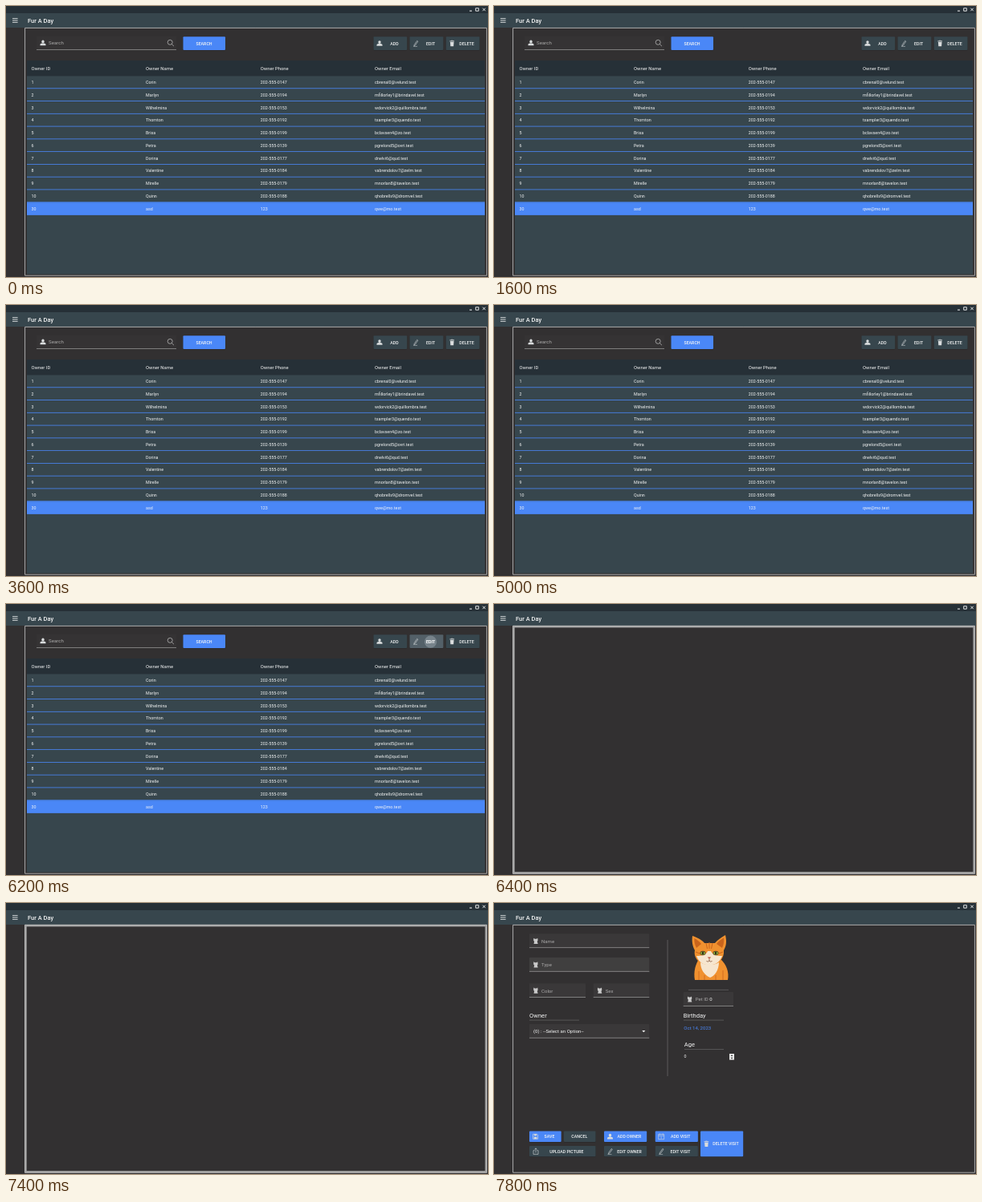
Write an HTML page with a canvas that moves like this. It is 600 px wide and 338 px high and loops after 8 s.

```html
<!DOCTYPE html>
<html lang="en">
<head>
<meta charset="utf-8">
<title>Pet owners</title>
<style>
  html, body { margin: 0; width: 100%; height: 100%; overflow: hidden; background: #323031; }
  canvas { display: block; width: 100vw; height: 100vh; }
</style>
</head>
<body>
<canvas id="stage"></canvas>
<script>
const W = 600, H = 338, LOOP = 8000, STEP = 200;
const canvas = document.getElementById('stage');
const ctx = canvas.getContext('2d');
const C = {
  dark: '#263037', teal: '#37464d', page: '#323031', field: '#3a3839', focus: '#403f3f',
  blue: '#4a87f7', hotBlue: '#7ea9f9', hotTeal: '#536068', line: '#5f5e5f',
  edge: '#b9b9b9', grey: '#aaa9a9', white: '#f4f5f5'
};
const CELL = 5.35, LABEL = 5.9, INPUT = 6.05, HEAD = 7.6;

const owners = [
  ['1', 'Corin', '202-555-0147', 'cbrenal0@velund.test'],
  ['2', 'Marlyn', '202-555-0194', 'mfillorley1@brindavel.test'],
  ['3', 'Wilhelmina', '202-555-0153', 'wdorvick2@quillombra.test'],
  ['4', 'Thornton', '202-555-0192', 'tsampler3@quendo.test'],
  ['5', 'Brisa', '202-555-0199', 'bclavsen4@zo.test'],
  ['6', 'Petra', '202-555-0139', 'pgrelond5@ovri.test'],
  ['7', 'Dorina', '202-555-0177', 'dnelvi6@qud.test'],
  ['8', 'Valentine', '202-555-0184', 'vabrendolov7@zelm.test'],
  ['9', 'Mirelle', '202-555-0179', 'mnorlan8@tavelon.test'],
  ['10', 'Quinn', '202-555-0188', 'qhobrells9@dromvel.test'],
  ['30', 'asd', '123', 'qwe@mo.test']
];

function rect(x, y, w, h, color) {
  ctx.fillStyle = color;
  ctx.fillRect(x, y, w, h);
}

function round(x, y, w, h, r, color) {
  ctx.fillStyle = color;
  ctx.beginPath();
  ctx.roundRect(x, y, w, h, r);
  ctx.fill();
}

function text(s, x, y, size, color = C.white, weight = 400, align = 'left') {
  ctx.font = `${weight} ${size}px Roboto, sans-serif`;
  ctx.textAlign = align;
  ctx.textBaseline = 'alphabetic';
  ctx.fillStyle = color;
  ctx.fillText(s, x, y + size * 0.355);
  return ctx.measureText(s).width;
}

function stroke(d, color, width = 0.7) {
  ctx.strokeStyle = color;
  ctx.lineWidth = width;
  ctx.stroke(new Path2D(d));
}

function fill(d, color) {
  ctx.fillStyle = color;
  ctx.fill(new Path2D(d));
}

function oval(x, y, rx, ry, color) {
  ctx.fillStyle = color;
  ctx.beginPath();
  ctx.ellipse(x, y, rx, ry, 0, 0, Math.PI * 2);
  ctx.fill();
}

// Each icon is drawn around its own centre.
const icons = {
  person(c) {
    oval(0, -1.5, 1.7, 1.9, c);
    fill('M-3.5 3.2V2C-3.5 .8-1.5.5 0 .5S3.5.8 3.5 2V3.2Z', c);
  },
  pencil(c) {
    stroke('M-1.8 1.8L1.7-3.2L2.8-2.4L-.7 2.5L-2.1 3.2Z', c, 0.6);
    stroke('M-3 3.8H2', c, 0.5);
  },
  trash(c) {
    rect(-2.8, -3.2, 5.6, 1, c);
    rect(-1, -3.8, 2, 0.7, c);
    fill('M-2.3-1.7H2.3L1.9 3.6H-1.9Z', c);
  },
  save(c) {
    stroke('M-3-3H2L3-2V3H-3Z', c, 0.7);
    rect(-1.6, -3, 3.2, 2, c);
    rect(-1.8, 0.5, 3.6, 2.5, c);
  },
  cat(c) {
    fill('M-2.7-3.6L-1.2-2.6H.9L2.3-3.6L2.6-.5L1.8.8L2.7 3.6H-2.5L-1.8.8L-2.8-.4Z', c);
  },
  face(c) {
    fill('M-3.6-3.8L-1.6-2.5H1.6L3.6-3.8V2L2 3.6H-2L-3.6 2Z', c);
  },
  upload(c) {
    stroke('M-1.5-1H-3V3.7H3V-1H1.5M0 1.8V-3.8M-1.5-2.3L0-3.8L1.5-2.3', c, 0.6);
  },
  calendar(c) {
    stroke('M-3.5-2.8H3.5V3.5H-3.5ZM-3.5-1H3.5M-2-3.8V-2M2-3.8V-2', c, 0.6);
    stroke('M0 .2V2.5', c, 0.6);
  }
};

function icon(name, x, y, color = '#d9dcdd') {
  ctx.save();
  ctx.translate(x, y);
  icons[name](color);
  ctx.restore();
}

function button(label, x, y, w, h, color, tx, glyph, gx) {
  round(x, y + 0.5, w, h, 1, 'rgba(0,0,0,.25)');
  round(x, y, w, h, 1, color);
  if (glyph) icon(glyph, gx, y + h / 2);
  text(label, tx, y + h / 2 + 0.1, 5.25, C.white, 500, 'center');
}

function field(x, y, w, label, value = '', glyph = 'person', color = C.field) {
  round(x, y, w, 17.5, [1, 1, 0, 0], color);
  rect(x, y + 17, w, 0.8, '#929192');
  icon(glyph, x + 8, y + 9, '#c9c9c9');
  const end = text(label + ' ', x + 15, y + 9.2, INPUT, C.grey);
  text(value, x + 15 + end, y + 9.2, INPUT);
}

function shell() {
  rect(0, 0, W, H, C.page);
  rect(0, 0, W, 9, C.dark);
  rect(0, 9, W, 18, C.teal);
  rect(577, 5.6, 3, 1, C.white);
  stroke('M584.7 2.7H588.3V6.2H584.7Z', C.white, 0.9);
  stroke('M593.3 2.7L596.8 6.2M596.8 2.7L593.3 6.2', C.white, 0.9);
  for (let i = 0; i < 3; i++) rect(8, 15.3 + i * 2.3, 6.6, 0.8, C.white);
  text('Fur A Day', 27, 18.2, 7.5, C.white, 500);
  stroke('M23.6 27.4H598.4V336.2H23.6Z', C.edge, 0.9);
}

function listPage(pressed) {
  rect(38, 37.5, 174, 17, '#353334');
  rect(38, 54.2, 174, 0.8, '#929192');
  icon('person', 46, 46);
  text('Search', 53, 46.2, 6.15, C.grey);
  ctx.strokeStyle = '#c4c4c4';
  ctx.lineWidth = 0.7;
  ctx.beginPath();
  ctx.arc(204.2, 45.3, 3, 0, Math.PI * 2);
  ctx.moveTo(206.3, 47.5);
  ctx.lineTo(209, 50.2);
  ctx.stroke();

  button('SEARCH', 220.5, 38.3, 52.5, 16.6, C.blue, 246.5);
  button('ADD', 457.5, 38.3, 41.7, 16.6, C.teal, 483.5, 'person', 465);
  button('EDIT', 502.5, 38.3, 41.9, 16.6, pressed ? C.hotTeal : C.teal, 528.6, 'pencil', 510);
  if (pressed) {
    oval(528.5, 47.2, 7.6, 7.6, 'rgba(170,180,188,.42)');
    text('EDIT', 528.6, 46.7, 5.25, C.white, 500, 'center');
  }
  button('DELETE', 547.7, 38.3, 41.8, 16.6, C.teal, 573.5, 'trash', 555.2);

  const cols = [31.5, 174, 316.7, 459], top = 87.4, pitch = 15.77;
  rect(26, 68, 570, 266.5, C.teal);
  rect(26, 68, 570, 19.4, C.dark);
  ['Owner ID', 'Owner Name', 'Owner Phone', 'Owner Email']
    .forEach((s, i) => text(s, cols[i], 77.7, LABEL));
  owners.forEach((row, r) => {
    const y = top + r * pitch;
    if (r === owners.length - 1) rect(26, y, 570, pitch, C.blue);
    else rect(26, y + pitch - 0.8, 570, 0.8, C.blue);
    row.forEach((s, i) => text(s, cols[i], y + 7.8, CELL));
  });
}

function ownerPage(hot) {
  field(44.2, 38.3, 76.6, 'Owner ID', '30');
  rect(68, 73.2, 159, 0.8, C.line);
  field(44.2, 90.5, 206, 'Name', 'asd');
  field(44.2, 123.6, 206, 'Phone', '123');
  field(44.2, 156.8, 206, 'Email', 'qwe@mo.test');

  rect(279, 38.5, 308.7, 287.2, C.teal);
  rect(279, 38.5, 308.7, 27, C.dark);
  const heads = ['Pet ID', 'Pet Name', 'Pet Type', 'Pet Color', 'Pet Age', 'Pet Sex', 'Pet Birth Date'];
  const xs = [284.5, 329.5, 368.5, 413.4, 458.3, 502.7, 548];
  heads.forEach((s, i) => {
    if (i === 1 || i === 6) {
      const cut = s.lastIndexOf(' ');
      text(s.slice(0, cut), xs[i], 48.2, LABEL);
      text(s.slice(cut + 1), xs[i], 55.4, LABEL);
    } else text(s, xs[i], 52, LABEL);
  });

  button('SAVE', 44.5, 285.8, 39.7, 13.2, C.blue, 69.5, 'save', 52.2);
  button('CANCEL', 87.5, 285.8, 39.5, 13.2, C.teal, 107);
  button('ADD PET', 140.5, 285.8, 53.5, 13.2, hot ? C.hotBlue : C.blue, 172.5, 'face', 148.3);
  button('EDIT PET', 140.5, 304.3, 53.5, 13.2, C.teal, 172.3, 'pencil', 148);
  button('DELETE PET', 197, 285.8, 53.2, 31.7, C.blue, 228.5, 'trash', 204.3);
}

function catPicture() {
  const orange = '#f0912f', deep = '#c9641c', cream = '#f6e6cf';
  fill('M250 96C248 86 251 76 255 70H282C289 76 293 86 291 96Z', orange);
  fill('M247 41C253 43 259 46 262 50H275C278 46 283 43 288 40C290 48 289 54 286 59C287 69 280 77 268 77S248 69 250 59C247 54 246 47 247 41Z', orange);
  fill('M249.5 44C253 46 256 48 258 51L252 56C250 52 249 48 249.5 44ZM286 43.5C282 46 279 48 277 51L284 56C286 52 286.5 48 286 43.5Z', deep);
  fill('M257 74C262 78 275 78 280 74C280 83 275 91 269 93C262 90 257 83 257 74Z', cream);
  fill('M252 66C258 66 264 65 266 60H270C272 65 278 66 284 66C281 74 275 77.5 268 77.5S255 74 252 66Z', cream);
  stroke('M264 50L265.5 57M268 49V57M272 50L270.5 57M251 61L256 63M285 61L280 63', deep, 1);
  for (const x of [260, 276]) {
    oval(x, 62.5, 3.5, 2.7, '#54351c');
    oval(x, 62.5, 2.8, 2.1, '#8dab39');
    oval(x, 62.5, 0.9, 1.9, '#1c1c17');
  }
  fill('M265.7 67.5H270.3L268 70Z', '#bb5b43');
  stroke('M268 70V72M264.5 72.5Q267 74 268 72Q269 74 271.5 72.5', '#744026', 0.7);
  stroke('M255 85V96M262 90V96M276 90V96M285 84V96', deep, 0.8);
}

function petPage() {
  field(44, 38.3, 149.3, 'Name', '', 'cat');
  field(44, 67.9, 149.3, 'Type', '', 'cat', C.focus);
  field(44, 100.2, 70, 'Color', '', 'cat');
  field(123.7, 100.2, 69.6, 'Sex', '', 'cat');
  text('Owner', 44, 140, HEAD);
  rect(44, 145.7, 62, 0.8, C.line);
  round(44, 151, 149.3, 17.3, [1, 1, 0, 0], C.field);
  rect(44, 167.8, 149.3, 0.8, '#929192');
  text('(0) : --Select an Option--', 49, 160, INPUT);
  fill('M184.3 159H188.3L186.3 161.2Z', C.white);
  rect(215.6, 46, 0.9, 170, C.line);

  catPicture();
  rect(242, 107.9, 50, 0.8, C.line);
  field(235.7, 111, 62.3, 'Pet ID', '0', 'cat');
  text('Birthday', 235.7, 140, HEAD);
  rect(236, 145.7, 50, 0.8, C.line);
  text('Oct 14, 2023', 236.3, 155.6, INPUT, C.blue);
  text('Age', 236.7, 176.7, HEAD);
  rect(237, 182.2, 49, 0.8, C.line);
  text('0', 236.6, 191.3, CELL);
  rect(293, 188, 6, 7.6, '#e9e9e9');
  fill('M294.6 191L296 189.3L297.4 191ZM294.6 192.7L296 194.4L297.4 192.7Z', '#333');

  const y1 = 284.6, y2 = 303, h = 13.3;
  button('SAVE', 44, y1, 39.7, h, C.blue, 69, 'save', 51.6);
  button('CANCEL', 87, y1, 39.5, h, C.teal, 106.3);
  button('ADD OWNER', 137, y1, 53.2, h, C.blue, 168.4, 'person', 144.5);
  button('ADD VISIT', 200.7, y1, 53.2, h, C.blue, 232.2, 'calendar', 208.2);
  button('UPLOAD PICTURE', 44, y2, 82.5, h, C.teal, 90.4, 'upload', 52);
  button('EDIT OWNER', 137, y2, 53.2, h, C.teal, 168.5, 'pencil', 144.5);
  button('EDIT VISIT', 200.7, y2, 53.2, h, C.teal, 232, 'pencil', 208.2);
  button('DELETE VISIT', 257, y1, 53.2, 31.7, C.blue, 288.4, 'trash', 264.4);
}

// The next page's frame lands just inside the fixed one.
function blankPage() {
  stroke('M24.4 28.2H597.7V335.4H24.4Z', '#898989', 2.2);
  stroke('M25 28.8H597.1V334.9H25Z', '#c2c2c2', 0.8);
  stroke('M23.6 27.4H598.4V336.2H23.6Z', '#c2c2c2', 0.8);
}

function draw(t) {
  shell();
  if (t < 6400) listPage(t >= 6200);
  else if (t < 6600) blankPage();
  else if (t < 7400) ownerPage(t >= 7000);
  else if (t < 7600) blankPage();
  else petPage();
}

function resize() {
  const dpr = window.devicePixelRatio || 1;
  canvas.width = Math.round(innerWidth * dpr);
  canvas.height = Math.round(innerHeight * dpr);
}

const start = performance.now();
function tick() {
  const t = Math.max(0, performance.now() - start) % LOOP;
  ctx.setTransform(canvas.width / W, 0, 0, canvas.height / H, 0, 0);
  draw(Math.floor(t / STEP) * STEP);
  requestAnimationFrame(tick);
}

addEventListener('resize', resize);
resize();
tick();
</script>
</body>
</html>
```
